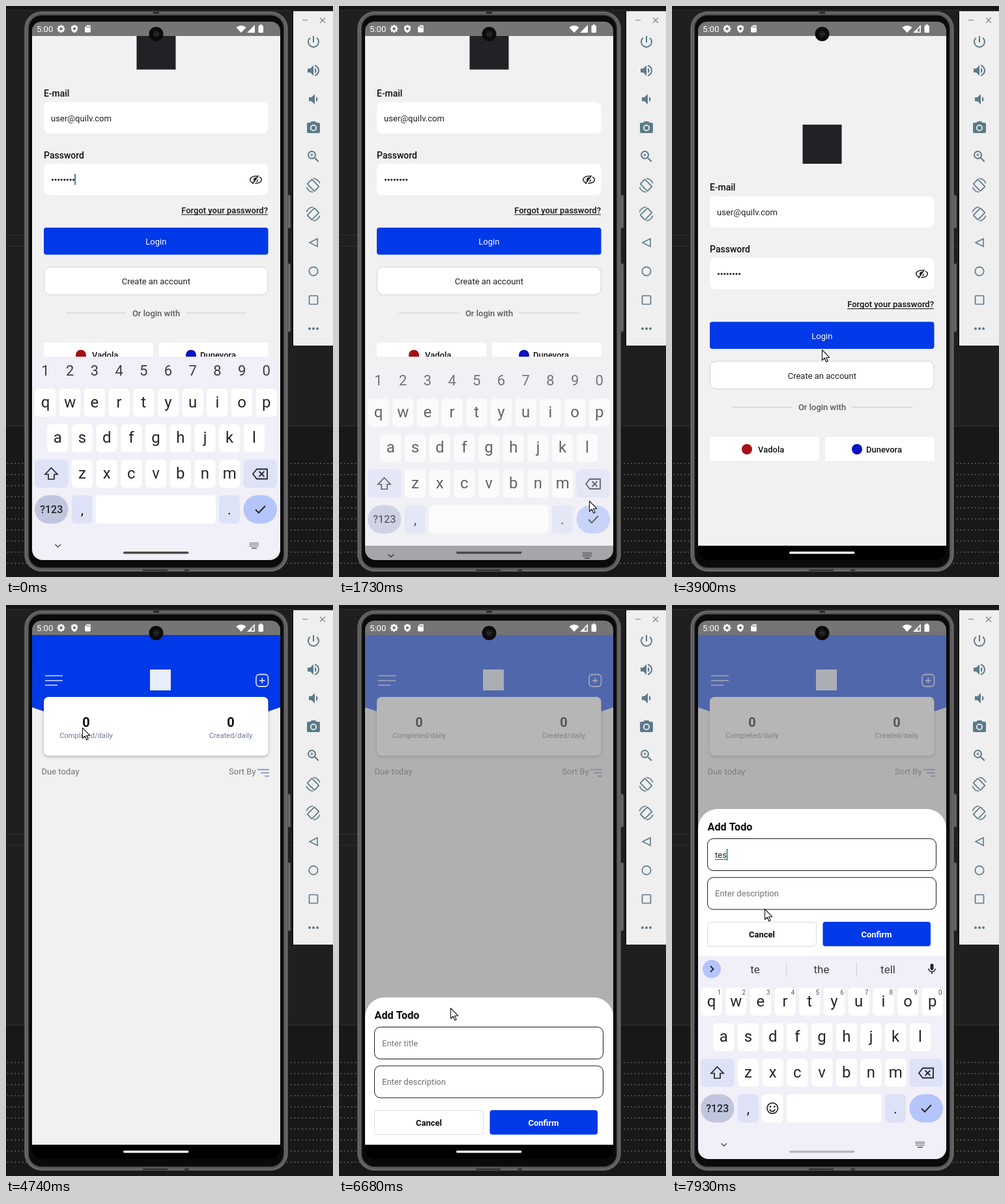
Write an HTML page with a canvas that moves like this. It is 502 px wide and 876 px high and loops after 8 s.

```html
<!DOCTYPE html>
<html lang="en">
<head>
<meta charset="utf-8">
<title>Todo app demo</title>
<style>
html, body { margin: 0; width: 100%; height: 100%; overflow: hidden; background: #1f1f1f; }
canvas { display: block; width: 502px; height: 876px; }
</style>
</head>
<body>
<canvas id="stage"></canvas>
<script>
const W = 502, H = 876, LOOP = 8000;
const BLUE = '#0039e8', PAGE = '#f1f1f1', TOOL = '#5c7a89', INK = '#1f1f23';
const dpr = window.devicePixelRatio || 1;
const stage = document.getElementById('stage');
const layerCanvas = document.createElement('canvas');
for (const c of [stage, layerCanvas]) { c.width = W * dpr; c.height = H * dpr; }
const main = stage.getContext('2d');
const layerCtx = layerCanvas.getContext('2d');
let g = main;

const clamp = v => Math.max(0, Math.min(1, v));
const ramp = (t, from, to) => clamp((t - from) / (to - from));
const smooth = p => p * p * (3 - 2 * p);
const easeOut = p => 1 - (1 - p) ** 3;

// ---- drawing helpers ----
function rr(x, y, w, h, r, fill, stroke, lw = 1) {
  g.beginPath();
  g.roundRect(x, y, w, h, r);
  if (fill) { g.fillStyle = fill; g.fill(); }
  if (stroke) { g.strokeStyle = stroke; g.lineWidth = lw; g.stroke(); }
}
function box(x, y, w, h, fill) { g.fillStyle = fill; g.fillRect(x, y, w, h); }
function dot(x, y, r, fill, stroke, lw = 1) {
  g.beginPath();
  g.arc(x, y, r, 0, 7);
  if (fill) { g.fillStyle = fill; g.fill(); }
  if (stroke) { g.strokeStyle = stroke; g.lineWidth = lw; g.stroke(); }
}
function poly(pts, stroke, lw = 1, fill) {
  g.beginPath();
  for (let i = 0; i < pts.length; i += 2) g.lineTo(pts[i], pts[i + 1]);
  if (fill) { g.closePath(); g.fillStyle = fill; g.fill(); }
  if (stroke) { g.strokeStyle = stroke; g.lineWidth = lw; g.stroke(); }
}
function text(s, x, y, size, color, weight = 400, align = 'left') {
  g.font = `${weight} ${size}px Roboto, sans-serif`;
  g.textAlign = align;
  g.fillStyle = color;
  g.fillText(s, x, y);
  return g.measureText(s).width;
}
const mid = (s, x, y, size, color, weight) => text(s, x, y, size, color, weight, 'center');
function icon(d, cx, cy, size, color) {
  at(cx - size / 2, cy - size / 2, () => {
    g.scale(size / 24, size / 24);
    g.fillStyle = color;
    g.fill(new Path2D(d), 'evenodd');
  });
}
function at(x, y, draw) { g.save(); g.translate(x, y); draw(); g.restore(); }
function clipped(x, y, w, h, r, draw) {
  g.save();
  g.beginPath();
  g.roundRect(x, y, w, h, r);
  g.clip();
  draw();
  g.restore();
}
// Draws a group with one shared opacity.
function layer(alpha, draw) {
  if (alpha <= 0) return;
  if (alpha >= 1) return draw();
  layerCtx.setTransform(1, 0, 0, 1, 0, 0);
  layerCtx.clearRect(0, 0, W * dpr, H * dpr);
  layerCtx.setTransform(dpr, 0, 0, dpr, 0, 0);
  g = layerCtx;
  draw();
  g = main;
  g.globalAlpha = alpha;
  g.drawImage(layerCanvas, 0, 0, W, H);
  g.globalAlpha = 1;
}

const ICON = {
  power: 'M13 3h-2v10h2V3zm4.83 2.17l-1.42 1.42A6.92 6.92 0 0 1 19 12c0 3.87-3.13 7-7 7A6.995 6.995 0 0 1 7.58 6.58L6.17 5.17A8.932 8.932 0 0 0 3 12a9 9 0 0 0 18 0c0-2.74-1.23-5.18-3.17-6.83z',
  loud: 'M3 9v6h4l5 5V4L7 9H3zm13.5 3c0-1.77-1.02-3.29-2.5-4.03v8.05c1.48-.73 2.5-2.25 2.5-4.02zM14 3.23v2.06c2.89.86 5 3.54 5 6.71s-2.11 5.85-5 6.71v2.06c4.01-.91 7-4.49 7-8.77s-2.99-7.86-7-8.77z',
  quiet: 'M18.5 12c0-1.77-1.02-3.29-2.5-4.03v8.05c1.48-.73 2.5-2.25 2.5-4.02zM5 9v6h4l5 5V4L9 9H5z',
  camera: 'M12 8.8a3.2 3.2 0 1 0 0 6.4a3.2 3.2 0 1 0 0-6.4zM9 2L7.17 4H4c-1.1 0-2 .9-2 2v12c0 1.1.9 2 2 2h16c1.1 0 2-.9 2-2V6c0-1.1-.9-2-2-2h-3.17L15 2H9zm3 15a5 5 0 1 1 0-10a5 5 0 1 1 0 10z',
  zoom: 'M15.5 14h-.79l-.28-.27A6.47 6.47 0 0 0 16 9.5 6.5 6.5 0 1 0 9.5 16c1.61 0 3.09-.59 4.23-1.57l.27.28v.79l5 4.99L20.49 19zM9.5 14a4.5 4.5 0 1 1 0-9a4.5 4.5 0 1 1 0 9zM12 10h-2v2H9v-2H7V9h2V7h1v2h2z',
  shield: 'M12 1L3 5v6c0 5.55 3.84 10.74 9 12 5.16-1.26 9-6.45 9-12V5zM12 8a4 4 0 1 1 0 8a4 4 0 1 1 0-8z',
  card: 'M18 2h-8L4 8v12c0 1.1.9 2 2 2h12c1.1 0 2-.9 2-2V4c0-1.1-.9-2-2-2zM9 5h2v4H9zM12.5 5h2v4h-2zM16 5h2v4h-2z',
  mic: 'M12 14c1.66 0 3-1.34 3-3V5a3 3 0 0 0-6 0v6c0 1.66 1.34 3 3 3zm5.3-3c0 3-2.54 5.1-5.3 5.1S6.7 14 6.7 11H5c0 3.41 2.72 6.23 6 6.72V21h2v-3.28c3.28-.48 6-3.3 6-6.72z'
};

// ---- desktop, phone and toolbar ----
function desktop() {
  box(0, 0, W, H, '#1f1f1f');
  box(0, 0, W, 6, '#161616');
  box(0, 6, W, 1, '#2c2c2c');
  for (const y of [351, 368]) box(0, y, W, 1, '#303030');
  box(0, 645, W, H - 645, '#181818');
  box(0, 644, W, 1, '#303030');
  for (let y = 701; y < 860; y += 17)
    for (let x = 2; x < W; x += 5.65) box(x, y, 1.6, 1.6, '#6c6c70');
}
function phone() {
  for (const [y, h] of [[290, 51], [395, 105]]) rr(431, y, 6, h, 2, '#6a6a6a', '#333');
  rr(28.5, 8.5, 404, 859, 26, '#6c6c6c', '#4c4c4c');
  rr(31.5, 11.5, 398, 853, 23, null, '#565656', 1.5);
  rr(34.5, 14, 392, 848, 20, '#0a0a0a', '#3a3a3a', 1.5);
  box(226, 9, 9, 3, '#2a2a2a');
  for (const [x, w] of [[210, 38], [274, 7]]) box(x, 864, w, 3, '#383838');
}
function rotateIcon(y, dir) {
  at(471.5, y, () => {
    g.scale(dir, 1);
    g.save();
    g.rotate(-Math.PI / 4);
    rr(-5, -7.8, 10, 15.6, 1, null, TOOL, 1.8);
    g.restore();
    for (const a of [-Math.PI / 2, Math.PI / 2]) {
      g.beginPath();
      g.arc(0, 0, 10.5, a, a + 1.3);
      g.strokeStyle = TOOL;
      g.lineWidth = 1.6;
      g.stroke();
    }
  });
}
function toolbar() {
  box(439, 8, 2, 514, '#111');
  box(441, 8, 61, 513, '#efefef');
  box(455, 21, 8, 1.3, '#8b989f');
  poly([482, 18, 490, 26], '#7d8b93', 1.3);
  poly([490, 18, 482, 26], '#7d8b93', 1.3);
  [['power', 55], ['loud', 99], ['quiet', 143], ['camera', 187], ['zoom', 231]]
    .forEach(([name, y]) => icon(ICON[name], 472, y, 24, TOOL));
  rotateIcon(275, 1);
  rotateIcon(319, -1);
  poly([478, 357, 466, 363, 478, 369, 478, 357, 466, 363], TOOL, 1.6);
  dot(472, 407, 6.7, null, TOOL, 1.7);
  rr(465.5, 444.5, 13, 13, 1, null, TOOL, 1.7);
  for (const x of [466, 472, 478]) dot(x, 495, 2, TOOL);
}
function statusBar(t) {
  box(40, 24, 381, 22, '#757575');
  text('5:00', 47, 40, 13.2, '#fff');
  dot(84.5, 35, 3.5, null, '#fff', 2.4);
  for (let i = 0; i < 8; i++)
    at(84.5, 35, () => { g.rotate(i * Math.PI / 4); box(-1.2, -6, 2.4, 2.5, '#fff'); });
  icon(ICON.shield, 105, 35, 13, '#fff');
  icon(ICON.card, 125.5, 35, 13, '#fff');
  g.beginPath();
  g.moveTo(361, 41);
  g.arc(361, 41, 11, -Math.PI * 0.74, -Math.PI * 0.26);
  g.fillStyle = '#fff';
  g.fill();
  poly([370, 41, 382, 41, 382, 29], null, 0, '#fff');
  if (t >= 3700) poly([377, 39.5, 380.5, 39.5, 380.5, 32.5, 377, 36], null, 0, '#858585');
  rr(387.5, 30, 7.5, 11, 1, '#fff');
  box(389.5, 28.5, 3.5, 2, '#fff');
  dot(230.5, 43, 11, '#0c0c0c');
  dot(230.5, 43, 5, '#1d1d1f');
  for (const x of [228, 231, 233]) box(x, 42.5, 1, 1, '#666');
}

// ---- login screen ----
function eye(x, y) {
  g.beginPath();
  g.ellipse(x, y, 8.8, 5.4, 0, 0, 7);
  g.strokeStyle = '#222';
  g.lineWidth = 1.5;
  g.stroke();
  dot(x, y, 3.5, '#222');
  poly([x + 5.5, y - 6.5, x - 3.5, y + 6.5], '#fff', 2.5);
  poly([x + 4, y - 6.5, x - 5, y + 6.5], '#222', 1.5);
}
function login(t) {
  box(40, 46, 381, 782, PAGE);
  const lifted = t < 1800;
  clipped(40, 46, 381, lifted ? 492 : 782, 0, () => at(0, lifted ? -144.5 : 0, () => {
    rr(200.5, 182, 60, 60, 0, '#222226');
    text('E-mail', 58, 283, 14, '#111', 500);
    rr(58, 292, 344.5, 48, 8, '#fff');
    text('user@quilv.com', 69, 321, 13.1, INK);
    text('Password', 58, 378, 14, '#111', 500);
    rr(58, 386.5, 344.5, 48, 8, '#fff');
    for (let i = 0; i < 8; i++) dot(71.5 + i * 4.6, 411, 1.6, INK);
    if (t < 1500) box(105.3, 402, 1.6, 17, '#2b5c7c');
    eye(383.5, 411);
    const w = text('Forgot your password?', 402, 462, 13, '#111', 500, 'right');
    box(402 - w, 464, w, 1, '#111');
    g.globalAlpha = 1 - 0.8 * smooth(ramp(t, 2350, 2500)) * (1 - smooth(ramp(t, 2750, 3000)));
    rr(58, 484.5, 344.5, 41.5, 4, BLUE);
    mid('Login', 230.3, 510.5, 13, '#fff');
    g.globalAlpha = 1;
    rr(58.5, 545, 343.5, 42.5, 9, '#fff', '#cfd2df');
    mid('Create an account', 230.3, 571.5, 13, INK);
    box(92, 615, 92.5, 1, '#c9c9c9');
    box(276, 615, 93, 1, '#c9c9c9');
    mid('Or login with', 230.5, 620, 13, '#5a5a5a', 500);
    rr(58, 661, 168, 37, 3, '#fff');
    rr(235, 661, 167.5, 37, 3, '#fff');
    dot(115, 680, 8, '#a80f14');
    dot(284, 680, 8, '#0a12c4');
    text('Vadola', 132, 684.5, 13, '#111', 500);
    text('Dunevora', 298, 684.5, 13, '#111', 500);
  }));
}

// ---- task list and sheet ----
function home() {
  box(40, 46, 381, 782, PAGE);
  g.beginPath();
  g.moveTo(40, 46);
  g.lineTo(421, 46);
  g.lineTo(421, 157);
  g.quadraticCurveTo(230.5, 226, 40, 157);
  g.fillStyle = BLUE;
  g.fill();
  const line = '#c9d4fb';
  [[108.5, 27], [116, 27], [123, 19]].forEach(([y, w]) => box(60, y - 0.8, w, 1.6, line));
  rr(221, 99, 32, 32, 0, '#e9edfd');
  rr(384, 106.5, 18.5, 18.5, 5, null, line, 1.8);
  box(389, 115, 8.5, 1.8, line);
  box(392.4, 111.6, 1.8, 8.5, line);
  g.save();
  g.shadowColor = 'rgba(0,0,0,.28)';
  g.shadowBlur = 5 * dpr;
  g.shadowOffsetY = 1.5 * dpr;
  rr(58, 141, 344.5, 90, 7, '#fff');
  g.restore();
  mid('0', 123, 187, 20, '#0b0b12', 700);
  mid('0', 345, 187, 20, '#0b0b12', 700);
  mid('Completed/daily', 123, 204, 11.15, '#6d7a98');
  mid('Created/daily', 345, 204, 11.15, '#6d7a98');
  text('Due today', 54.5, 260, 13, '#72727c');
  text('Sort By', 342, 260, 13, '#72727c');
  [[252.5, 386], [257.5, 391], [262.5, 397]].forEach(([y, x]) => box(x, y - 0.9, 404 - x, 1.8, '#8094c0'));
}
function sheet(t) {
  const show = easeOut(ramp(t, 6150, 6450));
  if (!show) return;
  box(40, 46, 381, 782, `rgba(133,133,133,${0.6 * show})`);
  const dy = t >= 7370 ? -289 : 226 * (1 - show);
  const typed = 'tes'.slice(0, Math.max(0, Math.floor((t - 7510) / 140)));
  at(0, dy, () => {
    rr(40, 602, 381, 226, [30, 30, 0, 0], '#fff');
    text('Add Todo', 54.5, 635, 16.2, '#0b0b0b', 700);
    rr(54.5, 647.5, 351, 49, 9, '#fff', '#161616');
    rr(54.5, 707, 351, 49, 9, '#fff', '#161616');
    let w = 0;
    if (typed) {
      w = text(typed, 66, 677, 13, INK);
      box(66, 679, w, 1, '#555');
    } else text('Enter title', 66, 677, 13, '#78787c');
    if (t >= 7230) box(66 + w, 663, 1.5, 18, '#078a7c');
    text('Enter description', 66, 736, 13, '#6f6f76');
    rr(54.5, 775.5, 167, 37, 4, '#fff', '#dcdcde');
    rr(231.5, 775, 165.5, 37.5, 4, BLUE);
    mid('Cancel', 138, 799, 13, '#0b0b0b', 700);
    mid('Confirm', 314, 799, 13, '#fff', 700);
  });
}

// ---- keyboard ----
const STEP = 37.7, PALE = '#dee2f7', KEYTEXT = '#24252b';
function keyRow(letters, x, y, hints) {
  [...letters].forEach((ch, i) => {
    const cx = x + i * STEP;
    rr(cx - 16.2, y, 32.4, 43, 6, '#fff');
    mid(ch, cx, y + 28.5, 24, KEYTEXT);
    if (hints) mid((i + 1) % 10, cx + 12, y + 11, 10, '#55565e');
  });
}
function keyboard(words, writing) {
  box(40, 538, 381, 330, '#f1eff7');
  if (writing) {
    dot(61, 558.5, 14, '#b4c5fc');
    poly([59, 554, 63.5, 558.5, 59, 563], KEYTEXT, 1.8);
    words.forEach((w, i) => mid(w, 127.5 + i * 102, 564.5, 17, '#3a3b42'));
    if (words.length) for (const x of [175, 283]) box(x, 548, 1, 22, '#cfced8');
    icon(ICON.mic, 399, 558.5, 20, KEYTEXT);
  } else {
    for (let i = 0; i < 10; i++) mid((i + 1) % 10, 60.5 + i * STEP, 567, 22, '#3c3d44');
  }
  keyRow('qwertyuiop', 60.5, 587, writing);
  keyRow('asdfghjkl', 79.3, 641.5);
  keyRow('zxcvbnm', 117, 696);
  rr(44, 696, 51.5, 43, 6, PALE);
  poly([69.5, 708.5, 79, 718.5, 74, 718.5, 74, 726, 65, 726, 65, 718.5, 60, 718.5, 69.5, 708.5, 79, 718.5], KEYTEXT, 1.7);
  rr(364.5, 696, 51.5, 43, 6, PALE);
  poly([379, 718, 385, 710.5, 401, 710.5, 401, 725.5, 385, 725.5, 379, 718, 385, 710.5], KEYTEXT, 1.8);
  poly([388.5, 714, 396.5, 722], KEYTEXT, 1.8);
  poly([396.5, 714, 388.5, 722], KEYTEXT, 1.8);
  rr(44, 750.5, 51.5, 43.5, 21.7, '#c1c6de');
  mid('?123', 69.7, 777.5, 16, KEYTEXT, 500);
  rr(100.8, 750.5, 32, 43.5, 6, PALE);
  mid(',', 117, 780, 22, KEYTEXT);
  const left = writing ? 175.7 : 138;
  if (writing) {
    rr(138, 750.5, 32.4, 43.5, 6, '#fff');
    dot(154.2, 772, 8.2, null, KEYTEXT, 1.7);
    for (const x of [151, 157.4]) dot(x, 769.7, 1.4, KEYTEXT);
    g.beginPath();
    g.arc(154.2, 772.7, 4.2, 0.2, Math.PI - 0.2);
    g.stroke();
  }
  rr(left, 750.5, 322 - left, 43.5, 6, '#fff');
  rr(327, 750.5, 32, 43.5, 6, PALE);
  mid('.', 343, 780, 22, KEYTEXT);
  rr(364.5, 750.5, 51.5, 43.5, 21.7, '#b4c5fc');
  poly([383, 772.5, 388, 777.5, 398, 767], KEYTEXT, 2);
  poly([75.5, 826, 79.7, 830, 84, 826], '#4a4b52', 1.4);
  for (let r = 0; r < 3; r++)
    for (let c = 0; c < 6; c++) box(374 + c * 2.4, 823 + r * 2.5, 1.5, 1.5, '#5a5b62');
  box(377, 831, 8, 1.5, '#5a5b62');
}
function keyboards(t) {
  if (t < 1900) {
    const p = ramp(t, 1668, 1953);
    layer(1 - 1.4 * p, () => at(0, 312 * p * p, () => keyboard([], false)));
  } else if (t > 7250) {
    const p = easeOut(ramp(t, 7250, 7510));
    layer(0.3 + 0.7 * p, () => at(0, 312 * (1 - p), () =>
      keyboard(t >= 7790 ? ['te', 'the', 'tell'] : [], true)));
  }
}
function homePill(t) {
  const v = t < 7250 ? 74 + 181 * ramp(t, 1870, 2900) : 255 - 69 * ramp(t, 7250, 7900);
  rr(180, 837, 100.5, 3.6, 1.8, `rgb(${v},${v},${v})`);
}

// ---- mouse pointer: time, x, y ----
const PATH = [
  [300, 138, 509], [1030, 430, 838], [1100, 430, 838], [1500, 388, 768], [1730, 384, 759],
  [1900, 384, 759], [2330, 219, 515], [2570, 219, 518], [2780, 219, 518], [3100, 230, 527],
  [4100, 230, 527], [4390, 230, 500], [4740, 117, 188], [4880, 76, 140], [5220, 278, 187],
  [5780, 391, 110], [6100, 391, 110], [6680, 171, 618], [6820, 156, 641], [7030, 100, 662],
  [7300, 100, 662], [7850, 142, 466]
];
function pointer(t) {
  if (t < PATH[0][0]) return;
  let i = PATH.findIndex(k => k[0] > t);
  if (i < 0) i = PATH.length - 1;
  const a = PATH[i - 1], b = PATH[i], p = smooth(ramp(t, a[0], b[0]));
  at(a[1] + (b[1] - a[1]) * p, a[2] + (b[2] - a[2]) * p, () => {
    g.lineJoin = 'round';
    poly([0.5, 0.5, 0.5, 16.5, 4.2, 13, 6.8, 19, 9.2, 18, 6.6, 12.2, 11.7, 12.2, 0.5, 0.5], '#111', 1.1, '#fff');
  });
}

function draw(t) {
  main.setTransform(dpr, 0, 0, dpr, 0, 0);
  desktop();
  phone();
  clipped(40, 24, 381, 826, [14, 14, 16, 16], () => {
    box(40, 24, 381, 826, '#000');
    const swap = ramp(t, 4130, 4280);
    if (swap < 1) login(t);
    layer(swap, home);
    sheet(t);
    keyboards(t);
    homePill(t);
    statusBar(t);
  });
  toolbar();
  pointer(t);
}
const start = performance.now();
function tick() {
  draw((performance.now() - start) % LOOP);
  requestAnimationFrame(tick);
}
tick();
</script>
</body>
</html>
```
